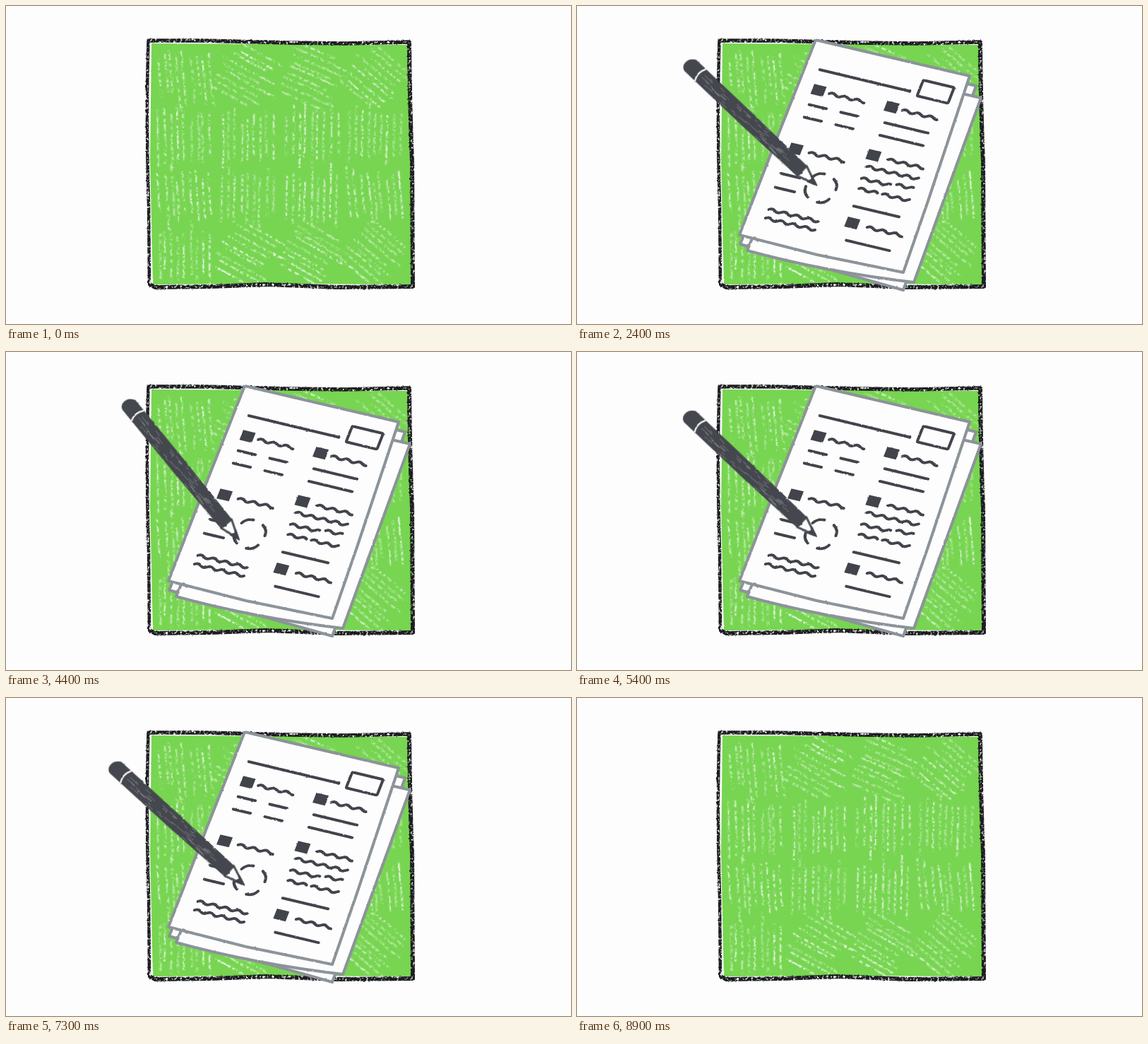
Write an HTML page that moves like this. It is 800 px wide and 450 px high and loops after 9100 ms.

```html
<!DOCTYPE html>
<html lang="en">
<head>
<meta charset="utf-8">
<title>Worksheet and pencil</title>
<style>
html, body { margin: 0; width: 100%; height: 100%; overflow: hidden; background: #fdfdfd; }
svg { display: block; width: 100vw; height: 100vh; }
path { stroke-linecap: round; stroke-linejoin: round; }
</style>
</head>
<body>
<svg viewBox="0 0 800 450">
  <defs>
    <filter id="rough" filterUnits="userSpaceOnUse" x="0" y="0" width="800" height="450" color-interpolation-filters="sRGB">
      <feTurbulence type="fractalNoise" baseFrequency=".2" numOctaves="2" seed="4"/>
      <feDisplacementMap in="SourceGraphic" scale="2" xChannelSelector="R" yChannelSelector="G"/>
    </filter>
    <filter id="crayon" filterUnits="userSpaceOnUse" x="0" y="0" width="800" height="450" color-interpolation-filters="sRGB">
      <feTurbulence type="fractalNoise" baseFrequency=".3" numOctaves="2" seed="8" result="n"/>
      <feColorMatrix in="n" values="0 0 0 0 0  0 0 0 0 0  0 0 0 0 0  4 0 0 0 -.9" result="m"/>
      <feDisplacementMap in="SourceGraphic" in2="n" scale="2.4" xChannelSelector="R" yChannelSelector="G"/>
      <feGaussianBlur stdDeviation=".5"/>
      <feComposite operator="in" in2="m"/>
    </filter>
    <filter id="chalk" filterUnits="userSpaceOnUse" x="0" y="0" width="800" height="450" color-interpolation-filters="sRGB">
      <feTurbulence type="fractalNoise" baseFrequency=".22" numOctaves="3" seed="3" result="n"/>
      <feColorMatrix in="n" values="0 0 0 0 0  0 0 0 0 0  0 0 0 0 0  4.5 0 0 0 -1.8" result="m"/>
      <feGaussianBlur in="SourceGraphic" stdDeviation=".6"/>
      <feComposite operator="in" in2="m"/>
    </filter>
    <filter id="wood" filterUnits="userSpaceOnUse" x="-10" y="-25" width="290" height="50" color-interpolation-filters="sRGB">
      <feTurbulence type="fractalNoise" baseFrequency=".2" numOctaves="2" seed="6"/>
      <feDisplacementMap in="SourceGraphic" scale="2" xChannelSelector="R" yChannelSelector="G"/>
    </filter>
  </defs>
  <rect width="800" height="450" fill="#fdfdfd"/>

  <path d="M206 53L400 54L570 55L575 240L576 394L390 393L208 394L204 220Z" fill="#77d551" filter="url(#rough)"/>
  <g id="streaks" fill="none" stroke="#fff" filter="url(#chalk)"></g>
  <g fill="none" stroke="#1c1b20" filter="url(#crayon)">
    <path d="M201.500 48Q198 160 202 280L203 392" stroke-width="4.500"/>
    <path d="M203 49L280 49L400 52L480 53L571 51" stroke-width="5.500"/>
    <path d="M571 52Q572 150 575 220L576 396" stroke-width="6"/>
    <path d="M204 394L211 398L290 397L370 394L470 398L576 397" stroke-width="6"/>
  </g>

  <g id="paper" opacity="0">
    <g filter="url(#rough)" fill="#fdfdfd" stroke="#8c9399" stroke-width="4">
      <path d="M345 62L565 113L462 402L231 337Z"/>
      <path d="M350 80L572 130L477 391Q350 376 241 346Z"/>
      <path d="M338 48L556 99L497 276L462 377L340 352L230 324L285 182Z"/>
    </g>
    <g filter="url(#rough)">
      <g id="marks" fill="none" stroke="#42444c" stroke-width="4" transform="matrix(.973 .233 -.365 .932 338 48)"></g>
    </g>
  </g>

  <g id="pencil" opacity="0">
    <g filter="url(#wood)">
      <path d="M2 0L29 -9L29 10Z" fill="#fdfdfd" stroke="#54565d" stroke-width="3"/>
      <path d="M0 0L13 -5Q10 0 14 5Z" fill="#42444c" stroke="#42444c" stroke-width="2"/>
      <path d="M27 -9Q31 -5 26 -2Q33 3 27 10L130 11L246 11Q255 6 254 -3Q253 -10 247 -11L130 -11Z" fill="#45474e" stroke="#45474e"/>
      <path id="shine" fill="none" stroke="#a3a4a8" stroke-width=".8" opacity=".6"/>
      <path d="M227 -11Q233 0 227 11" fill="none" stroke="#f4f4f4" stroke-width="2.400"/>
    </g>
  </g>
</svg>
<script>
const LOOP = 9100, STEP = 100, TURN = 2 * Math.PI;
const el = id => document.getElementById(id);

let seed = 17;
const rnd = () => (seed = (seed * 16807) % 2147483647) / 2147483647;
const jit = a => (rnd() - .5) * 2 * a;

// Scribble: patches of parallel strokes, upright at the left and across the middle, slanted elsewhere
const COLS = 4, ROWS = 4, W = 90, H = 84;
function patch(c, r) {
  const upright = c === 0 || r === 1 || r === 2;
  const angle = (upright ? 88 : c === 3 ? 42 : 27) * Math.PI / 180 + jit(.06);
  const cx = 208 + (c + .5) * W, cy = 58 + (r + .5) * H;
  const dx = Math.cos(angle), dy = Math.sin(angle);
  let out = '';
  for (let i = -4; i <= 4; i++) {
    const off = i * 9 + jit(2), slip = jit(10), len = 50 + rnd() * 30;
    const x = cx - dy * off + dx * (slip - len / 2), y = cy + dx * off + dy * (slip - len / 2);
    const d = `M${x} ${y}q${dx * len / 2 + jit(2)} ${dy * len / 2 + jit(2)} ${dx * len} ${dy * len}`;
    out += `<path d="${d}" stroke-width="5" opacity=".2"/>`;
    out += `<path d="${d}" stroke-width="${1 + rnd() * 1.4}" opacity="${.25 + rnd() * .55}"/>`;
  }
  return out;
}
let scribble = '';
for (let r = 0; r < ROWS; r++) for (let c = 0; c < COLS; c++) scribble += patch(c, r);
el('streaks').innerHTML = scribble;

// Page marks, in coordinates along the page's own edges
const marks = [];
const add = d => marks.push(`<path d="${d}"/>`);
const line = (x, y, len) => add(`M${x} ${y}h${len}`);
const wave = (x, y, len) => {
  let d = `M${x} ${y}`;
  for (let s = 3; s <= len; s += 3) d += `L${x + s} ${y - 1.8 * Math.sin(s / 18 * TURN)}`;
  add(d);
};
const heading = (x, y, gap) => {
  marks.push(`<rect x="${x - 8}" y="${y - 6.5}" width="16" height="13" fill="#42444c" stroke-width="2"/>`);
  wave(x + gap, y + 1, 53);
};
const LEFT = 25, RIGHT = 135;

line(21, 40, 131);
marks.push('<rect x="164" y="20" width="45" height="24" rx="2"/>');

heading(30, 69, 16);
heading(136, 68, 16);
for (const y of [92, 111]) {
  line(LEFT, y, 25);
  line(LEFT + 46, y, 25);
  line(RIGHT, y, 63);
}

heading(30, 158, 20);
for (const y of [197, 218]) line(LEFT - 2, y, 28);
for (const y of [251, 264]) wave(LEFT + 1, y, 72);
for (let k = 0; k < 4; k++) {
  const at = a => `${84 + 21 * Math.cos(a)} ${204 + 21 * Math.sin(a)}`;
  const mid = (k + 2 / 3) * TURN / 4;
  add(`M${at(mid - .4)}A16 16 0 0 1 ${at(mid + .4)}`);
}

heading(137, 141, 22);
wave(RIGHT - 1, 159, 75);
wave(RIGHT - 2, 177, 42);
wave(RIGHT + 48, 174, 26);
wave(RIGHT, 192, 27);
wave(RIGHT + 34, 192, 39);
line(RIGHT + 2, 218, 66);
heading(144, 242, 22);
line(RIGHT + 10, 268, 63);
el('marks').innerHTML = marks.join('');

let shine = '';
for (let i = 0; i < 46; i++) shine += `M${34 + rnd() * 178} ${jit(9.5)}l${3 + rnd() * 13} ${jit(.7)}`;
el('shine').setAttribute('d', shine);

const ramp = (t, a, b) => {
  const u = Math.max(0, Math.min(1, (t - a) / (b - a)));
  return u * u * (3 - 2 * u);
};

function render(time) {
  const t = Math.floor((time % LOOP) / STEP) * STEP / 1000;
  el('paper').setAttribute('opacity', ramp(t, 0, .8) * (1 - ramp(t, 8.3, 8.9)));

  // The pencil rocks while its tip drifts down the page
  const sway = Math.cos((t - 6.4) / 1.668 * TURN);
  const enter = 1 - ramp(t, 1.6, 2.7);
  const x = 340.6 - 9.5 * sway - 1.73 * t - 26 * enter;
  const y = 253 + 6.4 * sway + 2.44 * t;
  const tilt = 48.7 + 6.5 * sway;
  el('pencil').setAttribute('transform', `translate(${x} ${y}) rotate(${180 + tilt})`);
  el('pencil').setAttribute('opacity', ramp(t, 1.6, 2.2) * (1 - ramp(t, 7.5, 8)));
}

const start = performance.now();
let last = -1;
function tick() {
  const now = performance.now() - start, k = Math.floor(now / STEP);
  if (k !== last) { last = k; render(now); }
  requestAnimationFrame(tick);
}
render(0);
requestAnimationFrame(tick);
</script>
</body>
</html>
```
